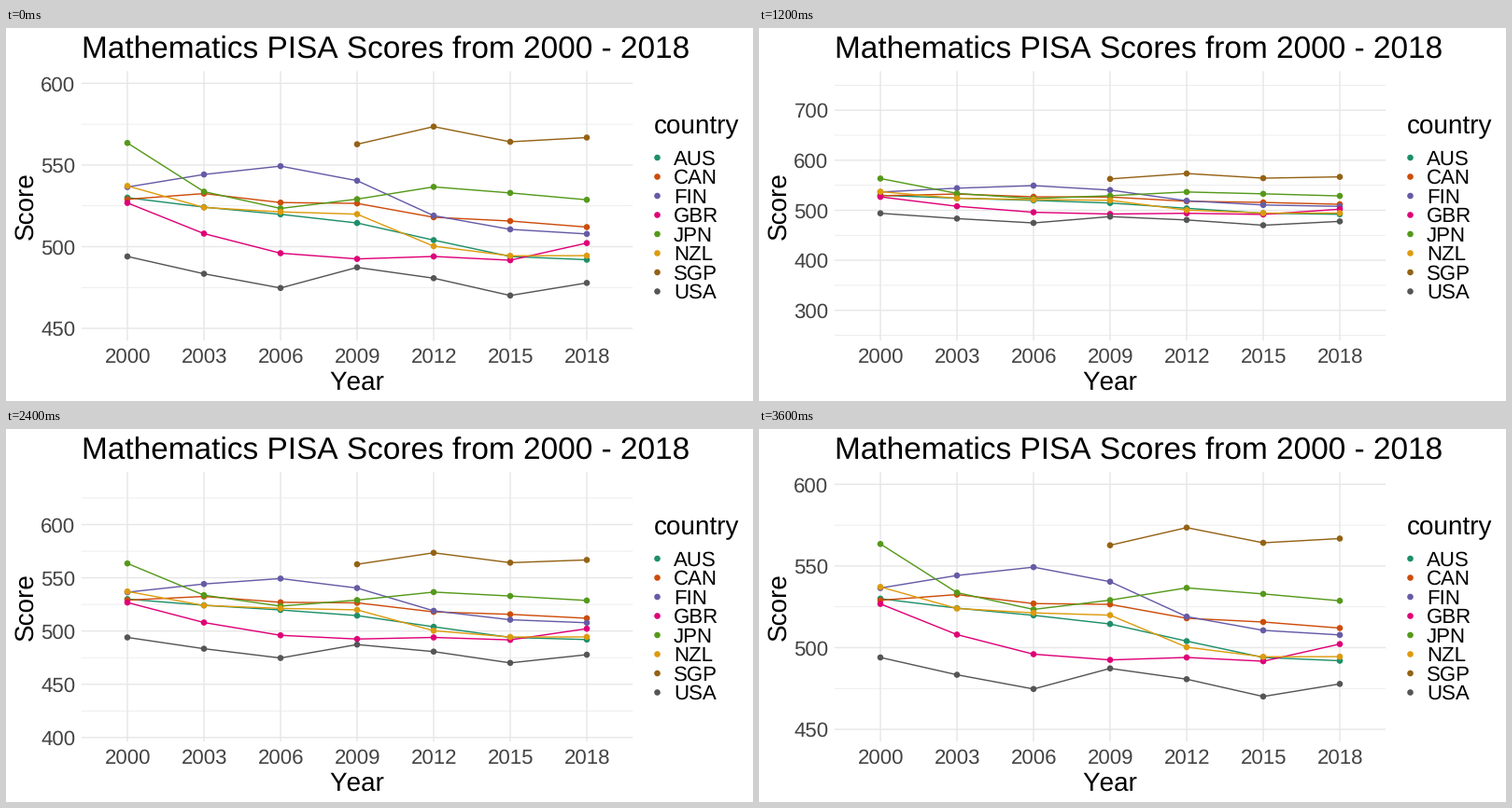
Animation, 800 px wide and 400 px high, one loop 4000 ms. Source, as a matplotlib script:

```python
import math
from itertools import combinations

import matplotlib.pyplot as plt
import numpy as np
from matplotlib.animation import FuncAnimation
from matplotlib.collections import LineCollection

plt.rcParams.update({
    "font.family": "Liberation Sans",
    "text.hinting": "none",
    "text.kerning_factor": 6,
    "path.snap": False,
})

W, H, DPI = 800, 400, 100
PX = 72 / DPI                                   # points per pixel
LEFT, RIGHT, TOP, BOTTOM = 80.8, 671.2, 46.2, 335.2
MID_X, MID_Y = (LEFT + RIGHT) / 2, (TOP + BOTTOM) / 2
BIG, MEDIUM, SMALL = 33.33, 27.9, 22.32         # text sizes in pixels
GRID, GREY = "#e7e7e7", "#434343"

FRAMES, HOLD, ZOOM = 40, 4, 32
WIDE, NARROW = 660, 165                         # visible score span
START, END = 500, 525                           # centre of the view

YEARS = range(2000, 2019, 3)
SCORES = {
    "AUS": ("#1c8f69", [530, 524.2, 519.8, 514.5, 504, 494, 492]),
    "CAN": ("#cd4c0b", [529, 532.5, 527, 526.5, 518, 515.7, 512]),
    "FIN": ("#655ba6", [536.5, 544.2, 549.3, 540.4, 519, 510.6, 507.8]),
    "GBR": ("#df0077", [526.8, 508, 496, 492.5, 494, 491.7, 502.2]),
    "JPN": ("#55991a", [563.5, 533.7, 523.4, 529.1, 536.6, 532.9, 528.7]),
    "NZL": ("#dd9b0e", [537.2, 524, 521.3, 519.9, 500.3, 494.4, 494.5]),
    "SGP": ("#946215", [562.7, 573.5, 564.2, 566.8]),
    "USA": ("#555555", [494, 483.4, 474.7, 487.3, 480.7, 470.1, 477.8]),
}


def year_x(year):
    return 130 + 82 * (year - 2000) / 3


def view(i):
    """Centre and span of the score axis: smooth zoom, eased by a cosine."""
    t = 1 if i == 0 else min(max((i - HOLD) / ZOOM, 0), 1)
    ease = (1 - math.cos(math.pi * t)) / 2
    span = WIDE * (NARROW / WIDE) ** ease
    pan = (WIDE**2 - span**2) / (WIDE**2 - NARROW**2)
    return START + (END - START) * pan, span


def nice_breaks(lo, hi, m=5):
    """Extended Wilkinson labelling: returns the step and the labels."""
    best = (-math.inf, None, None)
    for i, q in enumerate((1, 5, 2, 2.5, 4, 3)):
        for power in (10, 100):
            step = q * power
            if (hi - lo) / step > 12:
                continue
            ticks = range(math.floor(lo / step), math.ceil(hi / step) + 1)
            for a, b in combinations(ticks, 2):
                first, last = a * step, b * step
                miss = (hi - last) ** 2 + (lo - first) ** 2
                cover = 1 - 0.5 * miss / (0.1 * (hi - lo)) ** 2
                ratio = (max(last, hi) - min(first, lo)) / (step * (m - 1))
                dense = 2 - max(ratio, 1 / ratio)
                score = -0.25 * i / 5 + 0.2 * cover + 0.5 * dense
                if score > best[0]:
                    best = (score, step, [k * step for k in range(a, b + 1)])
    return best[1], [v for v in best[2] if lo <= v <= hi]


fig = plt.figure(figsize=(W / DPI, H / DPI), dpi=DPI, facecolor="white")
ax = fig.add_axes([0, 0, 1, 1])
ax.set(xlim=(0, W), ylim=(H, 0))
ax.axis("off")


def text(x, y, s, size, color="black", ha="left", **kw):
    return ax.text(x, y, s, fontsize=size * PX, color=color, ha=ha,
                   va="baseline", **kw)


def grid_lines(width, z, segments=()):
    lines = LineCollection(segments, colors=GRID, linewidths=width * PX,
                           zorder=z, capstyle="butt")
    return ax.add_collection(lines, autolim=False)


def dots(xy, colors):
    xy = np.asarray(xy)
    return ax.scatter(xy[:, 0], xy[:, 1], s=(6.6 * PX) ** 2, c=colors,
                      linewidths=0, zorder=4)


# Fixed parts
text(LEFT, 32.4, "Mathematics PISA Scores from 2000 - 2018", BIG)
text(MID_X, 387.4, "Year", MEDIUM, ha="center")
text(28, MID_Y, "Score", MEDIUM, ha="center", rotation=90,
     rotation_mode="anchor")
text(694, 112, "country", MEDIUM)
for year in YEARS:
    text(year_x(year) + 0.7, 359, str(year), SMALL, GREY, "center")
grid_lines(1.42, 2, [[(year_x(y), TOP), (year_x(y), BOTTOM)] for y in YEARS])

keys = [(697.5, 139 + 20.5 * k) for k in range(len(SCORES))]
dots(keys, [color for color, _ in SCORES.values()])
for (_, y), name in zip(keys, SCORES):
    text(715, y + 7.7, name, SMALL)

# Moving parts
minor = grid_lines(0.71, 1)
major = grid_lines(1.42, 2)
labels = [text(74.5, 0, "", SMALL, GREY, "right") for _ in range(9)]

series, points, colors = [], [], []
for color, values in SCORES.values():
    xs = [year_x(y) for y in YEARS][-len(values):]
    line, = ax.plot(xs, values, color=color, lw=1.42 * PX, zorder=3)
    series.append((line, np.array(values)))
    points += zip(xs, values)
    colors += [color] * len(values)
points = np.array(points)
marks = dots(points, colors)


def update(i):
    centre, span = view(i)
    lo, hi = centre - span / 2, centre + span / 2

    def to_y(v):
        return MID_Y - (v - centre) * (BOTTOM - TOP) / span

    def rows(values):
        return [[(LEFT, to_y(v)), (RIGHT, to_y(v))] for v in values]

    step, breaks = nice_breaks(lo, hi)
    half = step / 2
    halves = [k * half for k in range(math.ceil(lo / half),
                                      math.floor(hi / half) + 1)]
    major.set_segments(rows(breaks))
    minor.set_segments(rows(v for v in halves if v not in breaks))
    for k, label in enumerate(labels):
        label.set_visible(k < len(breaks))
        if k < len(breaks):
            label.set_text(f"{breaks[k]:.0f}")
            label.set_y(to_y(breaks[k]) + 8)

    for line, values in series:
        line.set_ydata(to_y(values))
    marks.set_offsets(np.column_stack([points[:, 0], to_y(points[:, 1])]))
    return [major, minor, marks, *labels, *(line for line, _ in series)]


anim = FuncAnimation(fig, update, frames=FRAMES, interval=100, repeat=True,
                     repeat_delay=0, blit=False)
plt.show()
```
